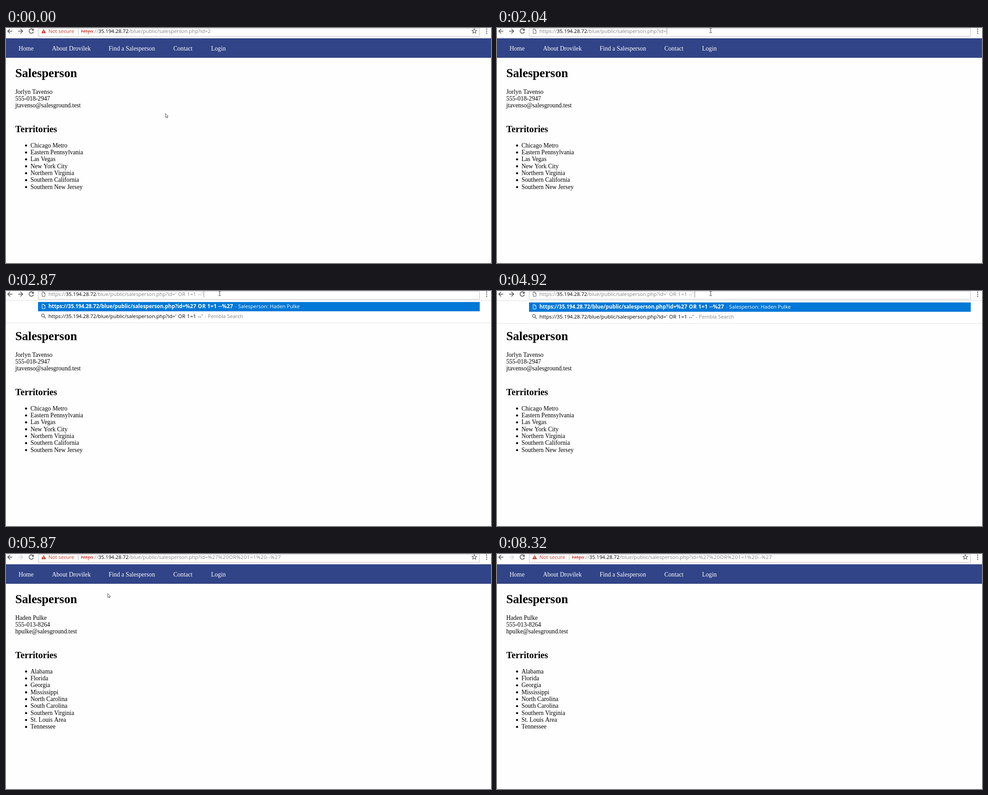
These frames come from a looping animation (1075 px wide and 521 px high, 8.6 s). An HTML page with a canvas:

```html
<!DOCTYPE html>
<html lang="en">
<head>
<meta charset="utf-8">
<title>Salesperson</title>
<style>
html, body { margin: 0; width: 100%; height: 100%; overflow: hidden; background: #fefefe; }
canvas { display: block; }
</style>
</head>
<body>
<canvas id="stage" width="1075" height="521"></canvas>
<script>
const LOOP = 8600;
const ctx = document.getElementById('stage').getContext('2d');

const UI = '11.3px "Open Sans", "Noto Sans", sans-serif';
const UI_BOLD = 'bold 11.5px "Open Sans", "Noto Sans", sans-serif';
const serif = (size, weight = '') => `${weight} ${size}px "Liberation Serif", Times, serif`;
const BODY = serif(13.6);
const LOOSE = 0.4; // letter spacing of the query value

const PAPER = '#fefefe', INK = '#000', GRAY = '#858585', ICON = '#555';
const RED = '#cc3b2e', BLUE = '#0078d7', NAVY = '#314488';

const HOST = '35.194.28.72', PATH = '/blue/public/salesperson.php?id=';
const BASE = 'https://' + HOST + PATH;
const TYPED = "' OR 1=1 --'", ENCODED = '%27%20OR%201=1%20--%27';

const people = [
  {
    lines: ['Jorlyn Tavenso', '555-018-2947', 'jtavenso@salesground.test'],
    areas: ['Chicago Metro', 'Eastern Pennsylvania', 'Las Vegas', 'New York City',
      'Northern Virginia', 'Southern California', 'Southern New Jersey']
  },
  {
    lines: ['Haden Pulke', '555-013-8264', 'hpulke@salesground.test'],
    areas: ['Alabama', 'Florida', 'Georgia', 'Mississippi', 'North Carolina',
      'South Carolina', 'Southern Virginia', 'St. Louis Area', 'Tennessee']
  }
];

const menu = [['Home', 28], ['About Drovilek', 102], ['Find a Salesperson', 227.5],
  ['Contact', 371], ['Login', 454.5]];

// [start, x, y] is an arrow, [start, 'beam'] a text cursor, [start] hides it.
const pointer = [
  [0, 353, 189], [550], [830, 475, 7], [970, 474, 19], [1095, 474, 12], [1220, 'beam'],
  [5720, 261, 58], [5870, 225, 87], [6000, 59, 96], [6150, 16, 112], [6270, 34, 160],
  [6390, 88, 197], [6510, 127, 152], [6670, 37, 126], [6820, 9, 160], [6970, 60, 206],
  [7090, 122, 202], [7250, 166, 194], [7520, 540, 350], [7640, 832, 461],
  [7920, 940, 480], [8040, 1026, 490], [8190, 1047, 513], [8320]
];

function rect(x, y, w, h, color) {
  ctx.fillStyle = color;
  ctx.fillRect(x, y, w, h);
}

// Returns the x where the text ends.
function text(str, x, y, color = INK, font = UI, tracking = 0) {
  ctx.font = font;
  ctx.letterSpacing = tracking + 'px';
  ctx.fillStyle = color;
  ctx.fillText(str, x, y);
  const end = x + ctx.measureText(str).width;
  ctx.letterSpacing = '0px';
  return end;
}

function stroke(d, color, width = 1) {
  ctx.strokeStyle = color;
  ctx.lineWidth = width;
  ctx.stroke(new Path2D(d));
}

function fill(d, color) {
  ctx.fillStyle = color;
  ctx.fill(new Path2D(d));
}

function disc(x, y, r, color) {
  ctx.fillStyle = color;
  ctx.beginPath();
  ctx.arc(x, y, r, 0, Math.PI * 2);
  ctx.fill();
}

function pageIcon(x, y, color) {
  stroke(`M${x - 3} ${y - 4.5}h4l2.5 2.5v7h-6.5zM${x + 1} ${y - 4.5}v2.5h2.5`, color);
}

function searchIcon(x, y, color) {
  stroke(`M${x + 2} ${y - 1.2}a3.2 3.2 0 1 1 -6.4 0a3.2 3.2 0 1 1 6.4 0M${x + 1} ${y + 1.2}l4 4`, color, 1.3);
}

function starIcon(x, y) {
  let d = '';
  for (let i = 0; i < 10; i++) {
    const a = Math.PI * (i / 5 - 0.5), r = i % 2 ? 2.4 : 5.6;
    d += (i ? 'L' : 'M') + (x + r * Math.cos(a)) + ' ' + (y + r * Math.sin(a));
  }
  stroke(d + 'Z', ICON, 1.1);
}

function drawPage(person) {
  rect(0, 23, 1075, 43, NAVY);
  rect(0, 65, 1075, 1, '#2b3b78');
  for (const [label, x] of menu) text(label, x, 50, '#fff', BODY);

  text('Salesperson', 20.5, 109, INK, serif(27.1, 'bold'));
  person.lines.forEach((line, i) => text(line, 20.5, 145.5 + i * 15.35, INK, BODY));
  text('Territories', 20.5, 230.5, INK, serif(20.3, 'bold'));
  person.areas.forEach((area, i) => {
    const y = 264.6 + i * 15.35;
    disc(44.5, y - 4, 2.3, INK);
    text(area, 54.2, y, INK, BODY);
  });
}

function drawButtons(t) {
  const loading = t >= 5040 && t < 5440;
  stroke('M14 7H4M9 2L4 7l5 5', ICON, 1.6);
  stroke('M27 7h10M32 2l5 5l-5 5', t < 5320 ? ICON : '#d2d2d2', 1.6);
  if (loading) {
    stroke('M51.5 2.5l9 9M60.5 2.5l-9 9', ICON, 1.6);
  } else {
    stroke('M60 3.8A4.9 4.9 0 1 0 60.8 8.2', ICON, 1.6);
    fill('M61.5 1v5h-5z', ICON);
  }
  for (const y of [2.5, 7, 11.5]) disc(1065.3, y, 1.3, ICON);
}

function drawInsecure(tail, selected) {
  fill('M83.5 2l5.2 9.5h-10.4z', RED);
  rect(83, 5, 1, 3.2, '#fff');
  rect(83, 9.2, 1, 1, '#fff');
  text('Not secure', 94, 11, RED);
  rect(159.5, 1, 1, 13, '#bbb');
  if (selected) {
    rect(166, 0, 289, 14, BLUE);
    text(BASE + tail, 166, 11, '#fff');
    return;
  }
  const x = text('https', 166, 11, RED);
  rect(166, 7, x - 166, 1, RED);
  drawRest(text('://', x, 11, GRAY), tail);
}

function drawPlainUrl(tail) {
  drawRest(text('https://', 94, 11, GRAY), tail);
}

function drawRest(x, tail) {
  x = text(HOST, x, 11);
  x = text(PATH, x, 11, GRAY);
  text(tail, x, 11, GRAY, UI, LOOSE);
}

function drawAddress(t) {
  rect(71, 0, 979, 19, '#fff');
  stroke('M71.5 .5H1049.5V18.5H71.5Z', '#c2c2c2');
  if (t < 2040 || t >= 5040) starIcon(1038, 7);
  if (t < 2040) {
    drawInsecure('2', t >= 1520 && t < 1770);
    if (t >= 1770) rect(455, 0, 1, 14, GRAY);
  } else if (t < 5040) {
    const pasted = t >= 2620;
    pageIcon(83, 7, ICON);
    drawPlainUrl(pasted ? TYPED : '');
    const lit = t < 3270 || (t >= 3820 && t < 4380) || t >= 4920;
    if (lit) rect(pasted ? 438 : 376, 0, 1, 14, GRAY);
  } else if (t < 5320) {
    stroke('M88 7a5 5 0 1 1 -10 0a5 5 0 1 1 10 0M83 6.2v3.6M83 4v1.2', ICON, 1.1);
    drawPlainUrl(ENCODED);
  } else {
    drawInsecure(ENCODED, false);
  }
}

// Adds a dash and a page title after a suggestion.
function drawNote(label, x, y, dash, color) {
  text(label, text('-', x + 4, y, dash) + 3.5, y, color);
}

function drawSuggestions(t) {
  if (t < 2210 || t >= 5040) return;
  const full = t < 2740;
  const rows = full ? 6 : 2;
  const top = t < 3270 ? 20 : 21;
  const height = 8 + rows * 21.5;
  rect(0, top, 1075, height, '#fff');
  rect(0, top, 1075, 1, '#dedede');
  rect(0, top + height - 1, 1075, 1, '#e2e2e2');
  rect(71, top + 4.4, 979, 20.6, BLUE);

  const base = i => top + 18 + i * 21.5;
  pageIcon(83, base(0) - 4, '#fff');
  let end = text(BASE, 94, base(0), '#fff', UI_BOLD);
  if (!full) end = text('%27 OR 1=1 --%27', end, base(0), '#fff', UI_BOLD, LOOSE);
  if (t >= 2870) drawNote('Salesperson: Haden Pulke', end, base(0), '#9cccf0', '#fff');

  searchIcon(83, base(1) - 4, ICON);
  end = text(BASE, 94, base(1));
  if (!full) end = text(TYPED, end, base(1), INK, UI, LOOSE);
  drawNote('Pembla Search', end, base(1), GRAY, GRAY);

  for (let i = 2; i < rows; i++) {
    pageIcon(83, base(i) - 4, ICON);
    end = text(BASE + (i - 1), 94, base(i), BLUE);
    drawNote('Salesperson', end, base(i), GRAY, GRAY);
  }
}

function drawPointer(t) {
  const [, x, y] = pointer.filter(step => step[0] <= t).pop();
  if (x === 'beam') {
    stroke('M471 .5h2l.7 .7l.7 -.7h2M473.7 1v9M471 10.5h2l.7 -.7l.7 .7h2', '#333');
  } else if (x !== undefined) {
    const d = `M${x + .5} ${y + .5}v8.8l2 -1.8l1.5 3l1.3 -.6l-1.4 -2.9h2.7z`;
    fill(d, '#fff');
    stroke(d, '#444', 0.9);
  }
}

function draw(now) {
  const t = now % LOOP;
  rect(0, 0, 1075, 521, PAPER);
  drawPage(people[t < 5320 ? 0 : 1]);
  rect(0, 22, 1075, 1, '#dcdcdc');
  drawButtons(t);
  drawAddress(t);
  drawSuggestions(t);
  drawPointer(t);
}

const start = performance.now();
function tick() {
  draw(performance.now() - start);
  requestAnimationFrame(tick);
}
tick();
</script>
</body>
</html>
```
